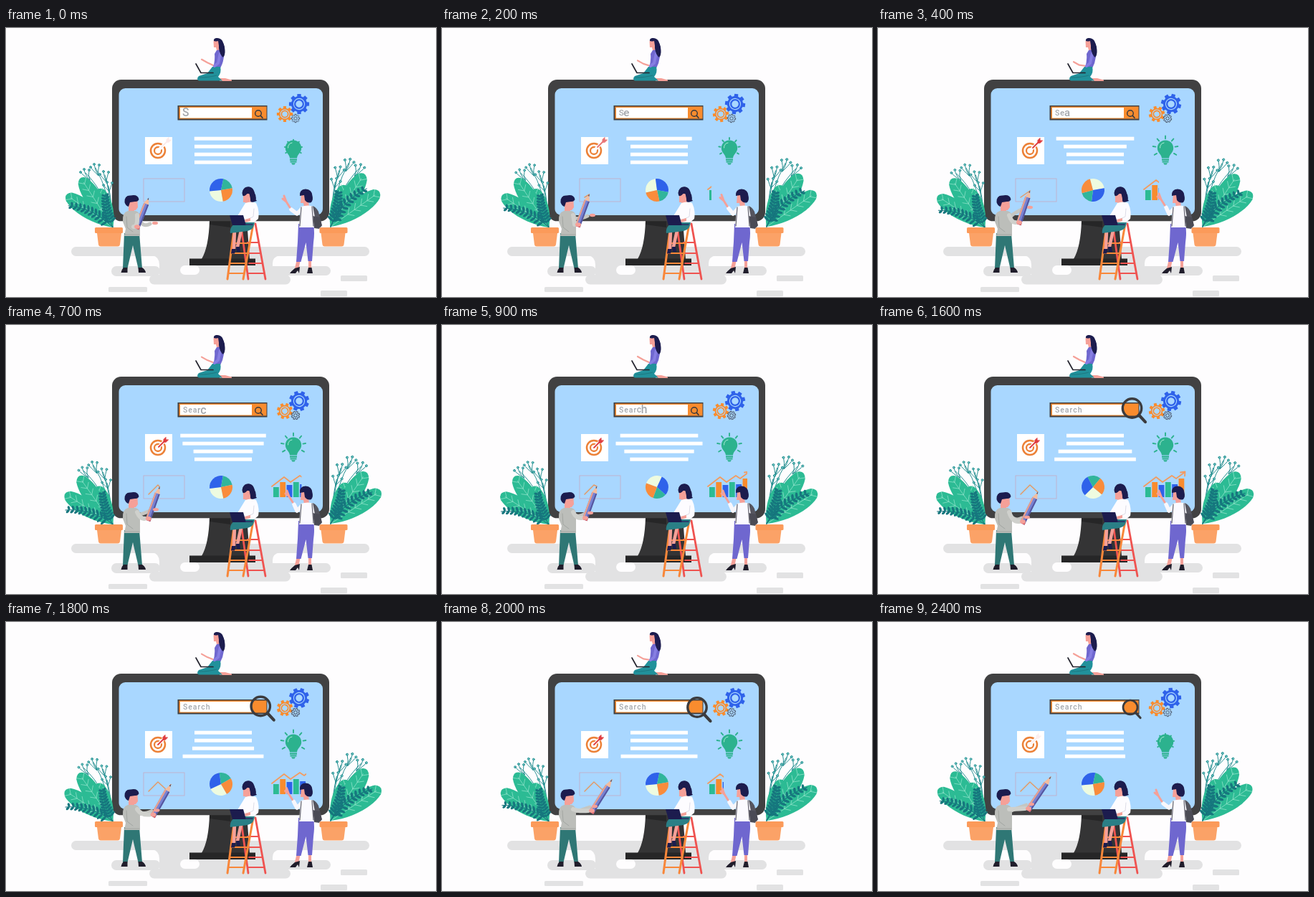
Recreate the animation shown at these times as an HTML page. Size 600 by 375 pixels, loop 2.5 s.

```html
<!DOCTYPE html>
<html lang="en">
<head>
<meta charset="utf-8">
<title>Search illustration</title>
<style>
html, body { margin: 0; width: 100%; height: 100%; overflow: hidden; background: #fefdfe; }
svg { display: block; width: 100vw; height: 100vh; }
.ground { fill: #e2e2e3; }
.dark { fill: #414142; }
.navy { fill: #1c1c4e; }
.shoe { fill: #201d2b; }
.skin { fill: #f5a098; }
.teal { fill: #2a7f86; }
.green { fill: #2cbb94; }
.violet { fill: #6f67cf; }
.orange { fill: #f98c2e; }
.blue { fill: #2f62ea; }
.white { fill: #fff; }
.stroke { fill: none; stroke-linecap: round; stroke-linejoin: round; }
#word text { font: 500 10.5px Roboto, Arial, sans-serif; fill: #a5a8ac; }
</style>
</head>
<body>
<svg id="stage" viewBox="0 0 600 375">
  <defs>
    <clipPath id="wipe"><rect id="wipeBox" x="368" y="200" width="0" height="45"/></clipPath>
    <g id="pot">
      <path fill="#fba267" d="M127 286H161L159 302Q158.500 304.500 156 304.500H132Q129.500 304.500 129 302Z"/>
      <rect fill="#fb9a5a" x="124" y="278" width="39" height="8" rx="1.500"/>
    </g>
  </defs>

  <g class="ground">
    <rect x="91" y="305" width="416" height="13" rx="6.500"/>
    <rect x="147" y="332" width="68" height="14" rx="7"/>
    <rect x="200" y="344" width="197" height="13.500" rx="6.700"/>
    <rect x="366" y="332" width="87" height="13" rx="6.500"/>
    <path d="M204 317H382Q372 319 372 328V345H214V330Q214 319 204 317Z"/>
    <rect x="143" y="361" width="54" height="7" rx="1.500"/>
    <rect x="467" y="345" width="37" height="8" rx="1.500"/>
    <rect x="439" y="366" width="37" height="8" rx="1.500"/>
  </g>
  <rect x="243" y="331" width="27" height="13" rx="6.500" fill="#fefdfe"/>

  <path fill="#343435" d="M284 268H336L340 322H273Q283 305 284 268Z"/>
  <path fill="#262627" d="M284 268H313V278L284 274ZM256 321.500H348V331H256Z"/>
  <rect class="dark" x="148" y="72" width="303" height="197.300" rx="12.500"/>
  <rect x="157.500" y="84" width="284.500" height="177" rx="9" fill="#a9d7ff"/>

  <!-- search bar -->
  <rect class="dark" x="239.500" y="108" width="125" height="20.500"/>
  <rect class="orange" x="241.500" y="109.500" width="122" height="17"/>
  <rect class="white" x="243" y="111" width="100" height="14.500"/>
  <g id="word"></g>

  <g id="gears"></g>

  <!-- target -->
  <rect class="white" x="194" y="152" width="38" height="38"/>
  <g class="stroke" stroke="#ec8137" stroke-width="2.500">
    <circle cx="212" cy="171" r="10"/><circle cx="212" cy="171" r="5" stroke-width="2.300"/>
  </g>
  <path class="stroke" stroke="#fff" stroke-width="4.500" d="M213 170L224 159"/>
  <g id="dart" class="stroke" stroke="#df3c3f">
    <path stroke-width="1.800" d="M212 171L221 162"/>
    <path fill="#df3c3f" stroke-width="1" d="M219 164V160.500L222 157.500V161H225.500L222.500 164Z"/>
  </g>

  <g id="lines" class="white"></g>

  <!-- bulb -->
  <g id="rays" class="stroke" stroke="#2cb28e" stroke-width="1.900"></g>
  <path fill="#2cb28e" d="M401 156.500C394 156.500 389.800 161.500 389.800 167.500C389.800 174 395.500 175.500 396 181.500H406C406.500 175.500 412.200 174 412.200 167.500C412.200 161.500 408 156.500 401 156.500Z"/>
  <path fill="#2cb28e" d="M396 182.500H406V184.700H396ZM396.500 185.500H405.500V187.500H396.500ZM398 188.300H404L402.500 190.500H399.500Z"/>
  <path class="stroke" stroke="#a9ecd4" stroke-width="1" d="M393.500 167Q393.500 161 399 160"/>

  <g id="pie"></g>

  <g clip-path="url(#wipe)">
    <g id="bars"></g>
    <path class="stroke" stroke="#f39b60" stroke-width="1.800" d="M371 225L388 212L397 219L410 210L416 214L427 206M422 205.500L428.500 204.500L428 210.500"/>
  </g>

  <!-- drawing panel -->
  <rect x="192" y="210" width="57" height="32" fill="none" stroke="#c2afc9" stroke-width=".9"/>
  <path id="sketch" class="stroke" stroke="#e39a67" stroke-width="1.500"/>

  <g id="plants"></g>

  <!-- woman on the monitor -->
  <path class="navy" d="M290 18C289 12.500 299 12.500 302 18C305 24 306 33 304 40Q299 37 298 30L294 21Z"/>
  <path class="skin" d="M289.500 18Q293 19 296 18L298 31H294L293 27L290 27Z"/>
  <path class="skin" d="M298 70H306L315 72.500V74H298Z"/>
  <path class="violet" d="M294 31Q303 29 304 37Q304 47 299 56H289Q292 44 291 36Z"/>
  <path fill="#21919b" d="M288 54H299Q301 62 296 68L302 73.500H269Q265 71 269 67L281 63Z"/>
  <path class="stroke" stroke="#1d717a" stroke-width=".8" d="M270 69Q284 69 294 66"/>
  <path class="stroke" stroke="#25252f" stroke-width="1.700" d="M265 50L272 62.500H289"/>
  <path id="topArm" class="stroke" stroke="#f5a098" stroke-width="2.200"/>
  <path class="stroke" stroke="#867ee2" stroke-width="4" d="M299 35L296 49L291 53"/>
  <path class="navy" d="M297 17Q305 19 305.500 31Q306 37 303 41Q298 37 297 28Z"/>

  <!-- ladder -->
  <g class="stroke" stroke="#ef5350" stroke-width="2.800">
    <path d="M348 273L362 350M329 284L338 350"/>
    <path stroke-width="2" d="M337 299H352M338 314H355M339 328H358M338 342H360"/>
  </g>
  <g class="stroke" stroke="#f8873a" stroke-width="3">
    <path d="M318 282L309 350M345 273L331 350"/>
    <path stroke-width="2.200" d="M316 300H340M314 314H338M312 328H336M310 342H333"/>
  </g>

  <!-- woman on the ladder -->
  <path class="stroke" stroke="#f5a098" stroke-width="4.500" d="M319 282L318 308M328 282L323 305"/>
  <path class="navy" d="M315 308H320.500L319 314.500H314ZM321 305H326L327 312H322Z"/>
  <path class="teal" d="M325 269H347Q347 281 337 283L313 286Q311 276 325 269Z"/>
  <path class="navy" d="M330 233C328 219 343 218 346 227C348 233 347 237 350 241L341 244Z"/>
  <path class="skin" d="M331 231L340 231L342 246H335L334 243H331Z"/>
  <path fill="#fdfcff" d="M334 244Q342 241 349 244Q354 254 352 266L346 271H328L327 263L323 262Z"/>
  <path class="stroke" stroke="#d9d8e4" stroke-width=".9" d="M346 252L345 263L334 268"/>
  <path class="skin" d="M333 267L341 265L341 269L334 271Z"/>
  <path class="navy" d="M312 261H331L335 275H316Z"/>
  <path class="stroke" stroke="#292960" stroke-width="1.600" d="M334 274H344"/>
  <path class="navy" d="M329.500 230Q331 221 340 223Q348 226 349 238L341 241Q342 235 338 229Q334 235 331 234Z"/>

  <!-- man with pencil -->
  <path fill="#2f7775" d="M165 286H186L190 335H184.500L177 303L169.500 335H163Z"/>
  <path class="shoe" d="M164 334H169.500V341H160.500Q161 337 164 334ZM184.500 334H190Q194.500 337 195 341H185Z"/>
  <path id="sideArm" class="stroke" stroke="#c5c6c2" stroke-width="5"/>
  <path class="skin" d="M171 241H183.500L184 250L181 254H179V258H171Z"/>
  <path class="navy" d="M165.500 243Q165 233 174 233.500Q184 231.500 185.500 239Q184 242.500 180 242L173 243L171 249Q167 248 165.500 243Z"/>
  <path fill="#bcbeba" d="M170 255H181Q187 257 187 264V290H165L167 280L163 270Q162 257 170 255Z"/>
  <path class="stroke" stroke="#9fa39f" stroke-width=".9" d="M168 263L169 278L177 284M166 288H186"/>
  <g id="pencil">
    <path fill="#7882d2" d="M0 -3.700H38V3.700H0Z"/>
    <path fill="#e9a18d" d="M0 -3.700H38V-1.500H0Z"/>
    <path fill="#54569f" d="M0 1.700H38V3.700H0Z"/>
    <path fill="#f3bd9f" d="M38 -3.700L47 0L38 3.700Z"/>
    <path fill="#4a4965" d="M44.500 -1L47.500 0L44.500 1Z"/>
    <path fill="#e76967" d="M0 -3.700H3V3.700H0Z"/>
  </g>
  <path id="manArm" class="stroke" stroke="#cfd0cc" stroke-width="6"/>
  <g class="skin"><ellipse id="handA" rx="4" ry="2.700"/><ellipse id="handB" rx="4" ry="2.200"/></g>

  <!-- woman at the chart -->
  <path class="skin" d="M406 322H411L408 338L402 339ZM422 322H426V337H422Z"/>
  <path class="violet" d="M408 273H429Q431 285 429 299L427 325H421.500L418.500 299L411.500 326H405L407 298Z"/>
  <path class="shoe" d="M403 335L410 333L409 342L407 338L404 342H396Q398 339 403 335ZM422 334H426.500L428 342H420Z"/>
  <path id="chartArm" class="stroke" stroke="#f8f7fc" stroke-width="5.500"/>
  <path id="chartHand" class="stroke" stroke="#f5a098" stroke-width="3"/>
  <path class="skin" d="M412 231H421L423 250H416L415 244H411Z"/>
  <path fill="#fbfaff" d="M411 249Q422 246 430 249L433 278H409Z"/>
  <path fill="#55555f" d="M428 248Q433 250 436 256L440 272L437 280L430 279L431 264Z"/>
  <path fill="#4b4b55" d="M428 262L438 264L441 275Q438 281 430 278Z"/>
  <path class="stroke" stroke="#6c6b76" stroke-width="1.300" d="M412 250L410 276M427 249L429 276"/>
  <path class="navy" d="M410 234Q409 225 418 224.500Q427 225 427.500 234Q429 239 426 243Q421 245 417 240L416 233Z"/>
</svg>

<script>
const LOOP = 2500, STEP = 100;
const $ = id => document.getElementById(id);
const clamp = (v, a = 0, b = 1) => Math.min(b, Math.max(a, v));

function add(parent, tag, attrs, text) {
  const el = document.createElementNS('http://www.w3.org/2000/svg', tag);
  for (const k in attrs) el.setAttribute(k, attrs[k]);
  if (text) el.textContent = text;
  parent.appendChild(el);
  return el;
}
const set = (el, k, v) => el.setAttribute(k, v);

// Linear keys: each row is [time, value, value...]
function at(t, keys) {
  let i = 0;
  while (i < keys.length - 2 && t > keys[i + 1][0]) i++;
  const a = keys[i], b = keys[i + 1];
  const p = clamp((t - a[0]) / (b[0] - a[0]));
  return a.slice(1).map((v, k) => v + (b[k + 1] - v) * p);
}

const polar = (r, a) => (r * Math.cos(a)).toFixed(2) + ' ' + (r * Math.sin(a)).toFixed(2);

// Gears
function gearPath(r, depth, teeth) {
  const pts = [], unit = 2 * Math.PI / teeth;
  for (let i = 0; i < teeth; i++)
    [[-.32, r - depth], [-.23, r], [.23, r], [.32, r - depth]].forEach(
      ([o, d]) => pts.push(polar(d, (i + o) * unit)));
  return 'M' + pts.join('L') + 'Z';
}
const ring = r => `M${r} 0A${r} ${r} 0 1 0 ${-r} 0A${r} ${r} 0 1 0 ${r} 0Z`;
const gears = [
  [409, 106, 14.3, 3.2, '#2f62ea', 1],
  [389, 120, 11.3, 3, '#f98c2e', -1],
  [404, 126, 6.3, 1.6, '#4a5668', 1]
].map(([x, y, r, depth, color, dir]) => {
  const g = add($('gears'), 'g');
  if (r > 7) {
    add(g, 'path', { d: gearPath(r, depth, 8) + ring(r * .33), fill: color, 'fill-rule': 'evenodd' });
    add(g, 'circle', { r: r * .53, fill: 'none', stroke: '#a9d7ff', 'stroke-width': 1.1 });
  } else {
    add(g, 'path', { d: gearPath(r - .5, depth, 8) + ring(2.2), fill: 'none', stroke: color, 'stroke-width': .9 });
  }
  return { g, x, y, dir };
});

// Search word, letter by letter
const letters = [];
let penX = 247;
[...'Search'].forEach((ch, i) => {
  const el = add($('word'), 'text', {}, ch);
  letters.push({ el, x: penX, start: 180 * i - 60 });
  penX += [7.2, 6.6, 6.7, 4.7, 6.5, 6.8][i];
});

const lens = add($('stage'), 'g', { class: 'stroke', stroke: '#3b3b3e' });
$('stage').insertBefore(lens, $('lines'));
const lensRing = add(lens, 'circle', {}), lensGrip = add(lens, 'path', {});

const rows = [[-50, 1400, 20, 2], [200, 1400, 20.5, 2], [580, 1400, 20, 2], [880, 1580, 17, 1]]
  .map(([start, span, grow, pow], i) => ({
    el: add($('lines'), 'rect', { y: 151.7 + 11 * i, height: 5 }), start, span, grow, pow
  }));

const rays = [-210, -170, -130, -90, -50, -10, 30].map(d => ({
  el: add($('rays'), 'path', { transform: 'translate(401 168)' }), a: d * Math.PI / 180
}));

['#eefbe0', '#2f62ea', '#31b59b', '#f98c3b'].forEach((fill, i) => {
  const edge = [170, 265, 372, 440, 530].map(d => d * Math.PI / 180);
  add($('pie'), 'path', { fill, d: `M0 0L${polar(16, edge[i])}A16 16 0 0 1 ${polar(16, edge[i + 1])}Z` });
});

['green', 'orange', 'blue', 'green', 'blue', 'orange'].forEach((cls, i) => {
  const top = [226, 219, 223, 219, 222, 214][i];
  add($('bars'), 'rect', { class: cls, x: 373 + 9.3 * i, y: top, width: 7.8, height: 240 - top });
});

// Plants, drawn around the stem base at 0,0
function leaf(parent, len, wide, angle) {
  const g = add(parent, 'g', { transform: `rotate(${angle})` });
  add(g, 'path', { class: 'green', d: `M0 0C${len * .3} ${-wide} ${len * .7} ${-wide * 1.3} ${len * .93} ${-wide * .6}Q${len * 1.05} 0 ${len * .93} ${wide * .6}C${len * .7} ${wide * 1.2} ${len * .3} ${wide} 0 0Z` });
  let d = `M0 0H${len * .9}`;
  for (let k = .35; k < .9; k += .13)
    d += `M${len * k} 0l6 ${-wide * .5}M${len * k} 0l6 ${wide * .5}`;
  add(g, 'path', { d, class: 'stroke', stroke: '#8ee2c9', 'stroke-width': .7 });
}
function fern(parent, len, bend) {
  const g = add(parent, 'g');
  add(g, 'path', { d: `M0 0Q${len / 2} ${bend} ${len} 0`, class: 'stroke', stroke: '#14707a', 'stroke-width': 1 });
  for (let k = .16; k < 1; k += .085) {
    const x = len * k, y = 2 * k * (1 - k) * bend, s = 10.5 - 5 * k;
    for (const side of [-1, 1])
      add(g, 'ellipse', { cx: s / 2, rx: s / 2, ry: 1.7, fill: '#16777e',
        transform: `translate(${x} ${y}) rotate(${side * 58})` });
  }
  return g;
}
function flowers(parent) {
  const g = add(parent, 'g', { class: 'stroke', stroke: '#1b8a8c', 'stroke-width': .9 });
  [[-38, -76], [-24, -83], [-11, -73], [-6, -58]].forEach(([x, y]) => {
    add(g, 'path', { d: `M0 0Q${x * .2} ${y * .6} ${x} ${y}` });
    [[-7, -1], [-2, -5], [5, -4]].forEach(([dx, dy]) => {
      add(g, 'path', { d: `M${x * .84} ${y * .87}Q${x + dx * .6} ${y + 3} ${x + dx} ${y + dy}` });
      add(g, 'circle', { cx: x + dx, cy: y + dy, r: 1.4, fill: '#7fcfcd' });
    });
  });
  return g;
}
function plant(place, potPlace, fernAngle) {
  const base = add($('plants'), 'g', { transform: place });
  const bloom = flowers(base), leaves = add(base, 'g');
  leaf(leaves, 58, 11, -113);
  leaf(leaves, 83, 12.5, -126);
  leaf(leaves, 80, 12, -148);
  const high = fern(base, 48, -6), low = fern(base, 69, 13);
  add($('plants'), 'use', { href: '#pot', transform: potPlace });
  return { bloom, leaves, high, low, fernAngle };
}
const plants = [
  plant('translate(149 278)', '', -154),
  plant('translate(453 277) scale(-1.05 1.07)', 'translate(600.5 0) scale(-1 1)', -134)
];

const TIP = [[0, 199, 237], [400, 212, 227], [900, 216, 225], [1200, 221, 231], [1600, 223, 233], [2000, 237, 220], [2400, 241, 216]];
const END = [[0, 182, 280], [400, 196, 274], [900, 199, 272], [1200, 201, 274], [1600, 201, 277], [2000, 208, 266], [2400, 209, 263]];
const LENS = [[900, 352, 119, 4.3], [1200, 352, 119, 10.5], [1600, 354.5, 116, 13.2], [2000, 356, 119, 13.2], [2400, 352, 119, 10]];
const TURN = [[0, 0], [400, 175], [900, 480], [1200, 555], [1600, 680], [2000, 720]];

function drawScreen(t) {
  letters.forEach(({ el, x, start }) => {
    const age = t - start, big = 1 + .6 * (1 - clamp(age / 330));
    set(el, 'opacity', age < 0 ? 0 : 1);
    set(el, 'transform', `translate(${x - (big - 1) * 2} ${122 + (big - 1) * 3}) scale(${big})`);
  });

  const [lx, ly, r] = at(t, LENS);
  set(lensRing, 'cx', lx); set(lensRing, 'cy', ly); set(lensRing, 'r', r);
  set(lensGrip, 'd', `M${lx + r * .72} ${ly + r * .72}L${lx + r * 1.4} ${ly + r * 1.45}`);
  set(lensRing, 'stroke-width', .5 + r * .22);
  set(lensGrip, 'stroke-width', .5 + r * .28);

  gears.forEach(({ g, x, y, dir }) =>
    set(g, 'transform', `translate(${x} ${y}) rotate(${dir * 90 * t / LOOP})`));

  const [shift, alpha] = at(t, [[0, 5, .1], [300, 5, 1], [450, 3.5, 1], [800, 0, 1], [2100, 0, 1], [2400, 2, .08]]);
  set($('dart'), 'transform', `translate(${shift} ${-shift})`);
  set($('dart'), 'opacity', alpha);

  rows.forEach(({ el, start, span, grow, pow }) => {
    const half = 40 + grow * Math.sin(Math.PI * clamp((t - start) / span)) ** pow;
    set(el, 'x', 303 - half); set(el, 'width', 2 * half);
  });

  const [glow] = at(t, [[0, 0], [400, 1], [900, .9], [1200, 0], [1600, 1], [2000, 1], [2400, 0]]);
  rays.forEach(({ el, a }) => {
    const near = 11.5 + 2.3 * glow;
    set(el, 'd', `M${polar(near, a)}L${polar(near + .8 + 3 * glow, a)}`);
  });

  set($('pie'), 'transform', `translate(300 226) rotate(${at(t, TURN)[0] - 90})`);
  set($('wipeBox'), 'width', at(t, [[0, 0], [100, 0], [400, 24], [900, 58], [1100, 64], [1700, 64], [2000, 25], [2300, 0], [2400, 0]])[0]);
}

function drawPeople(t) {
  const [tx, ty] = at(t, TIP), [ex, ey] = at(t, END);
  const path = [[199, 236], [212, 223], [224, 234], [241, 216]].filter(p => p[0] < tx);
  set($('sketch'), 'd', 'M' + [...path, [tx, ty]].map(p => p.join(' ')).join('L'));
  const angle = Math.atan2(ty - ey, tx - ex) * 180 / Math.PI;
  const scale = Math.hypot(tx - ex, ty - ey) / 47;
  set($('pencil'), 'transform', `translate(${ex} ${ey}) rotate(${angle}) scale(${scale} 1)`);

  const hx = ex + 1, hy = ey - 3;
  set($('manArm'), 'd', `M183 261Q${184 + (hx - 183) * .2} ${hy + 1} ${hx - 5} ${hy}`);
  set($('handA'), 'cx', hx); set($('handA'), 'cy', hy);
  const [bx, by] = at(t, [[0, 208, 272], [400, 212, 250], [900, 207, 262], [1600, 208, 268], [2000, 213, 257], [2400, 214, 254]]);
  set($('sideArm'), 'd', `M184 264Q190 ${by + 7} ${bx - 7} ${by + 1}`);
  set($('handB'), 'cx', bx); set($('handB'), 'cy', by);

  const [cx, cy] = at(t, [[0, 388, 234], [400, 392, 231], [900, 392, 231], [1600, 392, 231], [2000, 391, 232], [2400, 388, 234]]);
  set($('chartArm'), 'd', `M413 252L406 259L${cx + 10} ${cy + 19}`);
  set($('chartHand'), 'd', `M${cx + 8} ${cy + 16}L${cx + 3} ${cy + 8}L${cx} ${cy}M${cx + 3} ${cy + 8}L${cx - 2} ${cy + 4}`);

  const lift = 1.7 * Math.cos(2 * Math.PI * t / 833);
  set($('topArm'), 'd', `M291 53L281 ${50 - lift}L273 ${45.5 - lift}`);
}

function drawPlants(t) {
  const sway = Math.sin(Math.PI * t / LOOP);
  plants.forEach(({ bloom, leaves, high, low, fernAngle }) => {
    set(bloom, 'transform', `rotate(${-2.5 * sway})`);
    set(leaves, 'transform', `rotate(${3 - 3 * sway})`);
    set(low, 'transform', `rotate(${fernAngle - 12 * sway})`);
    set(high, 'transform', `rotate(${-102 - 7 * sway})`);
  });
}

const begin = performance.now();
function frame() {
  const t = Math.floor((performance.now() - begin) % LOOP / STEP) * STEP;
  drawScreen(t);
  drawPeople(t);
  drawPlants(t);
  requestAnimationFrame(frame);
}
frame();
</script>
</body>
</html>
```
